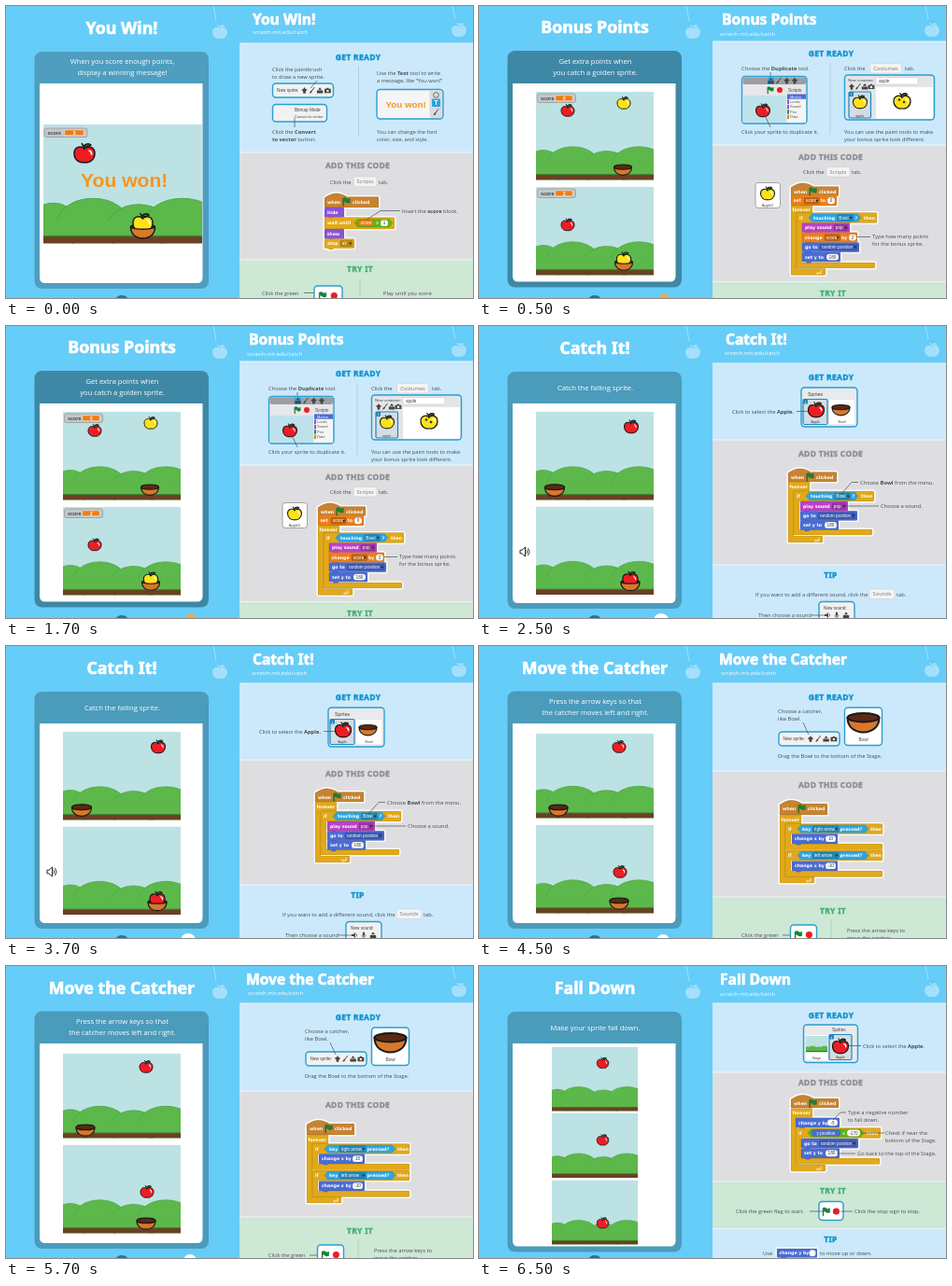
An HTML page that plays this animation: 500x313 px, repeating every 8 s.

```html
<!DOCTYPE html>
<html lang="en">
<head>
<meta charset="utf-8">
<title>Catch game cards</title>
<style>
html, body { margin: 0; width: 100%; height: 100%; overflow: hidden; background: #66ccf8; }
#reel { display: block; animation: cut 8s step-end infinite; }
@keyframes cut {
  0% { transform: translateY(0); }
  6.25% { transform: translateY(-313px); }
  31.25% { transform: translateY(-626px); }
  56.25% { transform: translateY(-939px); }
  81.25%, 100% { transform: translateY(-1252px); }
}
text { font: 500 5.75px "Open Sans", "Noto Sans", sans-serif; fill: #464a4f; }
text.title { font: 900 17.8px "Noto Sans", "Open Sans", sans-serif; fill: #fff; stroke: #fff; stroke-width: .7; stroke-linejoin: round; }
text.small { font-size: 15.6px; }
text.head { font: 900 8.5px "Noto Sans", "Open Sans", sans-serif; letter-spacing: .3px; stroke-width: .45; stroke-linejoin: round; }
text.lead { font-size: 7.6px; fill: #fff; }
text.url { font-size: 5.9px; font-weight: 400; fill: #fff; }
text.code { font: 700 4.7px "DejaVu Sans", sans-serif; fill: #fff; }
text.val { font: 4.7px "Liberation Sans", Arial, sans-serif; }
text.ui { font: 4.7px "Liberation Sans", Arial, sans-serif; fill: #444; }
text.won { font: 700 21.1px "Liberation Sans", Arial, sans-serif; fill: #f7941e; }
text.bold, .bold { font-weight: 700; }
</style>
</head>
<body>
<svg id="reel" width="500" height="1565" xmlns="http://www.w3.org/2000/svg"></svg>
<script>
const C = {
  sky: '#66ccf8', blue: '#cbe9fb', grey: '#dedee0', green: '#cde8d5',
  hat: '#c88330', gold: '#e1a91a', looks: '#8a55d7', sound: '#bb42c3',
  data: '#ee7d16', motion: '#4a6cd4', sense: '#2ca5e2', op: '#5cb712',
  red: '#ee1c25', yellow: '#fde21a', frame: '#2a9fd0'
};

// ---- basics ----
const rect = (x, y, w, h, fill, r = 0, more = '') =>
  `<rect x="${x}" y="${y}" width="${w}" height="${h}" rx="${r}" fill="${fill}" ${more}/>`;
const dot = (x, y, r, fill, more = '') => `<circle cx="${x}" cy="${y}" r="${r}" fill="${fill}" ${more}/>`;
const path = (d, fill, more = '') => `<path d="${d}" fill="${fill}" ${more}/>`;
const line = (d, color = '#4b4f54', w = .7) => path(d, 'none', `stroke="${color}" stroke-width="${w}"`);
const rich = s => s.replace(/\*(.+?)\*/g, '<tspan class="bold">$1</tspan>');
const text = (x, y, s, cls = '', css = '', more = '') => `<text x="${x}" y="${y}" class="${cls}" style="${css}" ${more}>${rich(s)}</text>`;
const mid = (x, y, s, cls, css) => text(x, y, s, cls, css, 'text-anchor="middle"');
const lines = (x, y, ...rows) => rows.map((s, i) => text(x, y + i * 8.2, s)).join('');
const place = (x, y, s, body) => `<g transform="translate(${x} ${y}) scale(${s})">${body}</g>`;
const head = (x, y, s, color) => mid(x, y, s, 'head', `fill:${color};stroke:${color}`);
const getReady = y => head(377, y, 'GET READY', '#1093cf');
const addCode = y => head(376.5, y, 'ADD THIS CODE', '#8c8f93');
const tryIt = y => head(379, y, 'TRY IT', '#48b078');
const tip = y => head(376.5, y, 'TIP', '#1093cf');
const split = (x, y, h, color = '#a9cbdc') => line(`M${x} ${y}v${h}`, color, .8);

// ---- pictures ----
const ink = 'stroke="#1a1a1a" stroke-width="1.5" stroke-linejoin="round"';
const appleBody = 'M0-5C-4-9-11-7-11 0C-11 7-5 11 0 9.5C5 11 11 7 11 0C11-7 4-9 0-5Z';
const apple = (x, y, w, fill = C.red) => place(x, y, w / 22,
  path(appleBody, fill, ink) +
  path('M0-4Q-1-8-3-11', 'none', ink) + path('M-1-8Q3-12 7-9Q4-6-1-8Z', '#2f7d32', ink) +
  path('M5-3q3 1 2.5 4', 'none', 'stroke="#fff" stroke-width="1.6" stroke-linecap="round"'));
const bowl = (x, y, w) => place(x, y, w / 26,
  path('M-13-4C-13 4-7 8 0 8C7 8 13 4 13-4Z', '#d9772b', ink) +
  `<ellipse cy="-4" rx="13" ry="3.6" fill="#5b2a12" ${ink}/>`);
const caught = (x, y, w, fill) => place(x, y, w / 26,
  `<ellipse cy="-2" rx="13" ry="3" fill="#5b2a12" ${ink}/>` + apple(0, -6.5, 21, fill) +
  path('M-13-2C-9 1 9 1 13-2C13 6 7 10 0 10C-7 10-13 6-13-2Z', '#d9772b', ink));
const hills = [[30, 238, 78], [150, 224, 108], [288, 242, 98], [420, 224, 112]];
const scene = (x, y, w, h = w * .75) => `<svg x="${x}" y="${y}" width="${w}" height="${h}" viewBox="0 0 480 360" preserveAspectRatio="none">` +
  rect(0, 0, 480, 360, '#bde2e4') +
  hills.map(([cx, top, r]) => `<ellipse cx="${cx}" cy="${top + 75}" rx="${r}" ry="75" fill="#5cb84a" stroke="#4eaa44" stroke-width="3"/>`).join('') +
  rect(0, 290, 480, 50, '#5cb84a') + rect(0, 338, 480, 22, '#6c3f24') + rect(0, 336, 480, 4, '#3f7d2e') + '</svg>';
const score = (x, y, w, n) => rect(x, y, w, 9.5, '#c4c7ca', 2, 'stroke="#8f9295" stroke-width=".7"') +
  text(x + 3.5, y + 6.7, 'score', 'ui bold', 'font-size:5.4px') + rect(x + w * .47, y + 1.8, w * .45, 6, C.data, 1.2, 'stroke="#fff" stroke-width=".5"') +
  mid(x + w * .7, y + 6.5, n, 'ui bold', 'fill:#fff');
const flag = (x, y, s = 1) => place(x, y, s, path('M-4-3.5Q-1.5-5 0-3.5T4-3.5V1Q2 2.4 0 1T-3-.5V5H-4Z', '#17843a', 'stroke="#0c5a25" stroke-width=".4"'));
const ghost = (x, y) => line(`M${x - 7} 0L${x - 4} ${y - 12}`, '#a4e0fb', 1) + place(x, y, .72,
  path(appleBody, '#a4e0fb') + line('M0-4Q-1-8-3-11', '#a4e0fb', 1.6) + path('M-1-8Q3-13 8-9Q4-6-1-8Z', '#a4e0fb'));

// ---- interface bits ----
const box = (x, y, w, h, fill = '#f1f1f2') => rect(x, y, w, h, fill, 3.5, `stroke="${C.frame}" stroke-width="1.4"`);
const tab = (x, y, w, s) => rect(x, y, w, 10.5, '#f3f3f4', 2, 'stroke="#c9cbcd" stroke-width=".5"') + mid(x + w / 2, y + 7.4, s, '', 'fill:#777');
const clickTab = y => text(347, y, 'Click the') + tab(372, y - 7.5, 25, 'Scripts') + text(399, y, 'tab.');
const drawIcons = {
  sprite: path('M0-3.6L1.2-1.600L3.200-.8L1.400.8L1.200 3.200H-1.200L-1.400.8L-3.200-.8L-1.200-1.600Z', '#444'),
  brush: line('M2.5-3.5L-1 1', '#444', 1) + path('M-1 .2Q-2.600 .5-2.800 3.2Q-.4 3 0 1Z', '#444'),
  upload: path('M-3.2 0H3.2V3H-3.2ZM-2-.8L0-3.4L2-.8Z', '#444'),
  camera: path('M-3.4-1.8H-1.4L-.8-2.8H.8L1.4-1.8H3.4V2.6H-3.4Z', '#444') + dot(0, .4, 1.3, '#f1f1f2'),
  speaker: path('M-3-1H-1L1-3V3L-1 1H-3Z', '#444') + line('M2-1.6Q3.3 0 2 1.6', '#444'),
  mic: rect(-1.1, -3.4, 2.2, 4.2, '#444', 1.1) + line('M-2-.2Q-2 2 0 2T2-.2M0 2V3.6', '#444')
};
const icons = (x, y, step, ...names) => names.map((n, i) => place(x + i * step, y, 1, drawIcons[n])).join('');
const newSprite = (x, y) => box(x, y, 65, 15) + text(x + 4.5, y + 9.4, 'New sprite:', 'ui') + icons(x + 34, y + 7.6, 8.3, 'sprite', 'brush', 'upload', 'camera');
const goBox = (x, y, w, h) => box(x, y, w, h, '#fff') + flag(x + w * .3, y + 10.5, .95) + dot(x + w * .71, y + 10.5, 3.6, C.red);
const tile = (x, y, w, h, name, body, on) => rect(x, y, w, h, on ? '#d3dde3' : '#fff', 1.5, `stroke="${on ? '#1b87c4' : '#d5d7d9'}" stroke-width="${on ? 1.2 : .4}"`) +
  body + mid(x + w / 2, y + h - 1.5, name, 'ui', 'font-size:3.8px') + (on ? rect(x, y, 5, 5, '#1b87c4', 1) + mid(x + 2.5, y + 4, 'i', 'ui bold', 'font-size:4px;fill:#fff') : '');

// ---- code blocks ----
const word = (x, s) => ({ x, s });
const slot = (x, w, s, fill = '#fff', kind = 'round') => ({ x, w, s, fill, kind });
const menu = (x, w, s, fill) => slot(x, w, s, fill, 'menu');
const hex = (x, w, fill) => slot(x, w, '', fill, 'hex');
const piece = (it, x, y, h) => {
  const px = x + it.x, cy = y + h / 2, base = cy + 1.7;
  if (!it.w) return text(px, base, it.s, 'code');
  if (it.kind === 'hex') return path(`M${px} ${cy}l3.5-4.2h${it.w - 7}l3.5 4.2l-3.5 4.2h${7 - it.w}Z`, it.fill, 'stroke="#0003" stroke-width=".5"');
  const isMenu = it.kind === 'menu';
  return rect(px, cy - 3.4, it.w, 6.8, it.fill, isMenu ? 1 : 3.2, 'stroke="#0003" stroke-width=".4"') +
    (isMenu ? text(px + 1.8, base - .2, it.s, 'val', 'fill:#fff') + path(`M${px + it.w - 3.8} ${cy - .8}h3l-1.5 2Z`, '#222')
      : mid(px + it.w / 2, base - .1, it.s, 'val', `fill:${it.fill === '#fff' ? '#333' : '#fff'}`));
};
const block = (x, y, w, h, fill, ...items) => ({
  d: `M${x} ${y + 1}q0-1 1-1H${x + w - 1}q1 0 1 1V${y + h - 1}q0 1-1 1H${x + 10}l-1 1.3h-4l-1-1.3H${x + 1}q-1 0-1-1Z`,
  fill, body: items.map(it => piece(it, x, y, h)).join('')
});
const hat = (x, y, w, h) => ({
  d: `M${x} ${y + 5}Q${x + 12} ${y - 4} ${x + 24} ${y + 4}H${x + w - 1}q1 0 1 1V${y + h}H${x}Z`,
  fill: C.hat, body: text(x + 3, y + 11, 'when', 'code') + flag(x + 23.5, y + 9, .95) + text(x + 30, y + 11, 'clicked', 'code')
});
const wrap = (x, y, w, top, bottom, foot, footW, ...items) => ({
  d: `M${x} ${y + 1}q0-1 1-1H${x + w - 1}q1 0 1 1V${y + top - 1}q0 1-1 1H${x + 6}V${bottom}H${x + footW - 1}q1 0 1 1V${bottom + foot - 1}q0 1-1 1H${x + 1}q-1 0-1-1Z`,
  fill: C.gold, body: items.map(it => piece(it, x, y, top)).join('')
});
const script = (...parts) =>
  parts.map(p => path(p.d, '#fff', 'stroke="#fff" stroke-width="3" stroke-linejoin="round"')).join('') +
  parts.map(p => path(p.d, p.fill, 'stroke="#0003" stroke-width=".5"') + p.body).join('');
const loop = (x, y, bottom, top = 10) => wrap(x, y, 23, top, bottom, 7, 37, word(1.5, 'forever'));
const loopArrow = (x, y) => line(`M${x} ${y}h3v-3m-3 1.4l-1.4 1.6l1.4 1.6`, '#fff', .8);
const goRandom = (x, y) => block(x, y, 61, 10.3, C.motion, word(3, 'go to'), menu(19, 40, 'random position', '#3c58b0'));
const setY = (x, y) => block(x, y, 41, 10.3, C.motion, word(3, 'set y to'), slot(26, 13, '180'));
const change = (x, y, axis, n, w = 49, h = 10.4) => block(x, y, w, h, C.motion, word(3, `change ${axis} by`), slot(w - 13, 11, n));
const playPop = (x, y) => block(x, y, 51, 10.3, C.sound, word(3, 'play sound'), menu(34, 15, 'pop', '#96359d'));
const ifTouch = (x, y, bottom) => wrap(x, y, 86, 11, bottom, 6, 84, word(3, 'if'), hex(13, 56, C.sense), word(18, 'touching'),
  menu(43.5, 17, 'Bowl', '#2385b5'), word(62.5, '?'), word(72, 'then'));
const ifKey = (x, y, key, bottom) => wrap(x, y, 104, 11, bottom, 6.5, 104, word(3, 'if'), hex(13, 76, C.sense), word(18, 'key'),
  menu(29, 28, key, '#2385b5'), word(58.5, 'pressed?'), word(91, 'then'));

// ---- card frame ----
const left = (title, rows, frame, y0, h, dy, extra) =>
  rect(0, 0, 250, 313, C.sky) + ghost(229, 28) +
  mid(124, 30.3 + dy, title, 'title') +
  rect(30.5, y0, 186.5, h, frame, 8) +
  path(`M36 83H210.5V${y0 + h - 12}q0 6-6 6H42q-6 0-6-6Z`, '#fff') +
  rows.map((s, i) => mid(124.5, (rows.length > 1 ? 62 : 69) + i * 12.3, s, 'lead')).join('') +
  dot(124, 318, 8, '#2f7196') + extra;
const right = (title, x, url, bands) =>
  rect(250, 0, 250, 313, C.sky) + ghost(485, 26) +
  text(x, 20, title, 'title small') + text(url[0], url[1], 'scratch.mit.edu/catch', 'url') +
  bands.map(([y, c]) => rect(250, y, 250, 313 - y, C[c]) + rect(250, y - .5, 250, .9, '#f2f8fb')).join('');

// ---- cards ----
const win = left('You Win!', ['When you score enough points,', 'display a winning message!'], '#4f9dbf', 49, 254, 0,
    scene(40, 127, 170) + score(41, 131, 46, '5') + apple(84, 158, 22) + text(80, 194, 'You won!', 'won') + caught(146.5, 239, 26, C.yellow)) +
  right('You Win!', 264, [264, 30], [[40, 'blue'], [157, 'grey'], [272, 'green']]) + getReady(58) +
  lines(285, 69.5, 'Click the paintbrush', 'to draw a new sprite.') + newSprite(285.5, 83) + line('M333 80L326 88') +
  box(285.5, 105.5, 58, 18.5) + text(309, 112.5, 'Bitmap Mode', 'ui') + text(309, 119.5, 'Convert to vector', 'ui', 'font-size:4px') +
  line('M309 130V120') + lines(285, 137, 'Click the *Convert*', '*to vector* button.') + split(377.5, 64, 76) +
  lines(397, 74, 'Use the *Text* tool to write', 'a message, like “You won!”') +
  box(397, 89.5, 71, 31.5, '#f5f5f6') + rect(453.5, 90.5, 13.5, 29.5, '#d9dbde', 2) + text(406.5, 109, 'You won!', 'won', 'font-size:9.8px') +
  dot(460.5, 95.5, 2.8, 'none', 'stroke="#555" stroke-width=".8"') + rect(456, 99.5, 9, 8.5, '#2ca5e2', 1) + mid(460.5, 106, 'T', 'ui bold', 'fill:#fff;font-size:6.5px') +
  icons(460.5, 114, 0, 'brush') + lines(397, 137, 'You can change the font', 'color, size, and style.') +
  addCode(174) + clickTab(190.5) +
  script(hat(341, 200.5, 58, 15.5), block(341, 216, 21, 10.4, C.looks, word(3, 'hide')),
    block(341, 226.4, 75, 12.6, C.gold, word(3, 'wait until'), hex(32, 41, C.op), slot(36, 17, 'score', C.data), word(54.5, '&gt;'), slot(60, 8, '1')),
    block(341, 239, 21, 10.4, C.looks, word(2.5, 'show')), block(341, 249.4, 32, 10.4, C.gold, word(3, 'stop'), menu(17, 13, 'all', '#b9870f'))) +
  line('M422 219.5H401L386 229') + text(424, 221.5, 'Insert the *score* block.') +
  tryIt(285) + text(274, 309.5, 'Click the green') + line('M319 307.5H337') + goBox(330, 300, 30, 20) + split(379, 293, 20, '#a5cfb3') +
  lines(404, 309.5, 'Play until you score', 'enough points to win.');

const palette = [['Motion', C.motion], ['Looks', C.looks], ['Sound', C.sound], ['Pen', '#0e9a6c'], ['Data', C.data]];
const bonus = left('Bonus Points', ['Get extra points when', 'you catch a golden sprite.'], '#3e88a6', 48, 253.5, -1,
    scene(61, 92, 126) + score(62.5, 94, 41, '0') + apple(95, 112, 14) + apple(155, 104, 14, C.yellow) + bowl(154, 175.5, 19) +
    scene(61, 194, 126) + score(62.5, 196, 41, '2') + apple(95, 234.5, 14) + caught(155, 276, 19, C.yellow) + dot(198, 316, 7, '#f9a63a')) +
  right('Bonus Points', 260, [258, 31.5], [[38, 'blue'], [149, 'grey'], [295.5, 'green']]) + getReady(54) +
  text(281, 69, 'Choose the *Duplicate* tool.') + line('M312 71V78') + box(281.5, 75.5, 69.5, 50.5, '#e6e7e9') +
  rect(282.5, 76.5, 67.5, 7.5, '#9b9ea2', 2) + rect(309, 76.5, 7, 7.5, '#2ca5e2') + icons(312.5, 80.2, 8.5, 'upload', 'brush', 'sprite', 'sprite') +
  flag(312, 90, .8) + dot(322, 90, 3, C.red) + text(331, 91.5, 'Scripts', 'ui') +
  rect(282.5, 96, 46.5, 29, '#bfe2ea') + apple(304, 112, 15) + rect(330, 94.5, 20, 30.5, '#f5f5f6') + rect(330, 94.5, 20, 5.2, C.motion) +
  palette.map(([s, c], i) => rect(330, 95 + i * 5.4, 2, 4.5, c) + text(333, 98.5 + i * 5.4, s, 'ui', `font-size:4px;fill:${i ? '#555' : '#fff'}`)).join('') +
  line('M312 130L305 115') + text(281, 136.5, 'Click your sprite to duplicate it.') + split(376, 62, 76) +
  text(391, 69, 'Click the') + tab(418.5, 61.5, 34, 'Costumes') + text(456, 69, 'tab.') +
  box(391.5, 74, 96, 48, '#e3e5e7') + text(395, 80.5, 'New costume:', 'ui', 'font-size:4.4px') + icons(399, 86.5, 7, 'sprite', 'brush', 'upload', 'camera') +
  tile(396, 92, 23.5, 28, 'apple', apple(408, 103, 15, C.yellow), 1) + rect(425, 76.5, 45, 7.5, '#fff', 1, 'stroke="#bbb" stroke-width=".5"') + text(428, 82, 'apple', 'ui') +
  rect(425, 87, 61, 34, '#fff') + apple(453, 102, 18, C.yellow) + dot(450, 100.5, 1.3, '#333') + dot(455, 103, 1.3, '#333') +
  lines(391, 136.5, 'You can use the paint tools to make', 'your bonus sprite look different.') +
  addCode(165) + clickTab(180) + rect(296, 189.5, 26.5, 27, '#fff', 3, 'stroke="#8c8f93" stroke-width=".8"') + apple(309, 201, 15, C.yellow) + mid(309, 214.5, 'Apple2', 'ui', 'font-size:4px') +
  script(hat(334, 189.5, 51, 14), block(334, 203.5, 49, 10.5, C.data, word(2.5, 'set'), menu(14, 16, 'score', '#be6412'), word(31.5, 'to'), slot(39, 8, '0')),
    loop(334, 214, 281.5, 8), ifTouch(340, 221.5, 275),
    playPop(346, 232.5), block(346, 242.8, 59, 10.6, C.data, word(2.5, 'change'), menu(24, 16.5, 'score', '#be6412'), word(42, 'by'), slot(50, 8, '2')),
    goRandom(346, 253.5), setY(346, 264)) + loopArrow(363, 286.5) +
  line('M419 247.5H405') + lines(421, 249, 'Type how many points', 'for the bonus sprite.') + tryIt(310.5);

const catchIt = left('Catch It!', ['Catch the falling sprite.'], '#4b9bbb', 49, 254, -.5,
    scene(61, 92, 126) + apple(163, 108, 15) + bowl(81, 176, 21) + scene(61, 193.5, 126) + caught(162, 276, 20, C.red) +
    place(48, 242, 1, path('M-4-1.8H-2L1.5-5V5L-2 1.8H-4Z', 'none', 'stroke="#222" stroke-width="1"') + line('M3-2Q4.5 0 3 2M4.5-4Q7.5 0 4.5 4', '#222', .9)) + dot(195, 316, 8, '#fff')) +
  right('Catch It!', 264, [263, 31], [[40, 'blue'], [122, 'grey'], [256, 'blue']]) + getReady(58) +
  text(271, 93.5, 'Click to select the *Apple.*') + box(345, 66, 60, 42, '#e9eaec') + text(352, 74.5, 'Sprites', 'ui', 'font-size:5.2px') +
  tile(347, 78.5, 26, 27, 'Apple', apple(361, 90, 17), 1) + tile(374.5, 78.5, 28, 27, 'Bowl', bowl(387.5, 90, 19)) + line('M340 91.5H352') +
  addCode(140) + script(hat(331, 152.5, 52, 14.5), loop(331, 167, 225), ifTouch(337, 177, 218), playPop(344, 188), goRandom(344, 198.2), setY(344, 208.3)) + loopArrow(361, 230) +
  line('M406 167.5H399L388 180') + text(408, 169.5, 'Choose *Bowl* from the menu.') + line('M428 193H392') + text(430, 195, 'Choose a sound.') +
  tip(269.5) + text(296, 290, 'If you want to add a different sound, click the') + tab(418, 282, 27, 'Sounds') + text(447, 290, 'tab.') +
  text(299, 312, 'Then choose a sound') + box(364, 295.5, 38, 24) + text(369, 303.5, 'New sound:', 'ui') + line('M356 310H370') + icons(373, 310, 10, 'speaker', 'mic', 'upload');

const move = left('Move the Catcher', ['Press the arrow keys so that', 'the catcher moves left and right.'], '#4b9bbb', 48.5, 254.5, 0,
    scene(61, 94, 126, 90.5) + apple(150, 108, 14) + bowl(85, 176, 20) +
    scene(61, 192, 126) + apple(151, 242, 14) + bowl(150, 276, 20) + dot(197, 316, 7, '#fff')) +
  right('Move the Catcher', 257, [259, 31], [[40, 'blue'], [134, 'grey'], [269, 'green']]) + getReady(58) +
  lines(320, 72, 'Choose a catcher,', 'like Bowl.') + newSprite(321, 92) + line('M347 82L353 95') + box(391.5, 66, 40, 40.5, '#fff') + bowl(411.5, 82, 34) + mid(411.5, 102, 'Bowl', 'ui') +
  text(320, 119.5, 'Drag the Bowl to the bottom of the Stage.') + addCode(152) +
  script(hat(322, 165, 51, 16), loop(322, 181, 247), ifKey(328, 190.5, 'right arrow', 212), change(335, 201.5, 'x', '10'),
    ifKey(328, 219, 'left arrow', 241), change(335, 230.5, 'x', '-10')) + loopArrow(352, 252) +
  tryIt(286.5) + text(281, 312, 'Click the green') + line('M325 310H337') + goBox(333.5, 299, 28, 22) + split(377, 293, 20, '#a5cfb3') + lines(394, 307, 'Press the arrow keys to', 'move the catcher.');

const drops = [[86.5, 104], [158, 186.5], [229.5, 275.5]];
const fall = left('Fall Down', ['Make your sprite fall down.'], '#4b9bbb', 49, 257.5, 0,
    drops.map(([y, ay]) => scene(78, y, 92) + apple(132.5, ay, 12.5)).join('')) +
  right('Fall Down', 258, [258, 32], [[40, 'blue'], [114, 'grey'], [231, 'green'], [281.5, 'blue']]) + getReady(56) +
  box(347.5, 63, 58, 40.5, '#e9eaec') + text(378, 70, 'Sprites', 'ui') + tile(349.5, 73.5, 24, 28, 'Stage', scene(350, 75, 23)) +
  tile(375, 73.5, 24, 27, 'Apple', apple(387, 86, 17), 1) + line('M409 85.5H396') + text(411, 87.5, 'Click to select the *Apple*.') +
  addCode(128) + script(hat(334, 138, 51, 14), loop(334, 152.5, 213), change(339, 162.7, 'y', '-5', 47),
    wrap(339, 173.5, 91, 11, 206, 6.5, 90, word(3, 'if'), hex(13, 60, C.op), slot(17, 31, 'y position', C.motion), word(49.5, '&lt;'), slot(55, 14, '-170'), word(76, 'then')),
    goRandom(345, 185), setY(345, 195.6)) + loopArrow(363, 218) +
  line('M393 157H387L379 165') + lines(395, 159, 'Type a negative number', 'to fall down.') +
  line('M434 179H409') + lines(435, 181, 'Check if near the', 'bottom of the Stage.') + line('M403 201H383') + text(405, 203, 'Go back to the top of the Stage.') +
  tryIt(244) + text(275, 265, 'Click the green flag to start.') + goBox(364, 252.5, 26, 20) + line('M354 263H368M400 263H387') + text(402, 265, 'Click the stop sign to stop.') +
  tip(296) + text(304, 310, 'Use') + script(block(319, 303, 43, 9.5, C.motion, word(2.5, 'change y by'), slot(34.5, 7, ''))) + text(365, 310, 'to move up or down.');

document.getElementById('reel').innerHTML = [win, bonus, catchIt, move, fall]
  .map((card, i) => `<svg y="${i * 313}" width="500" height="313" overflow="hidden">${card}</svg>`).join('');
</script>
</body>
</html>
```
